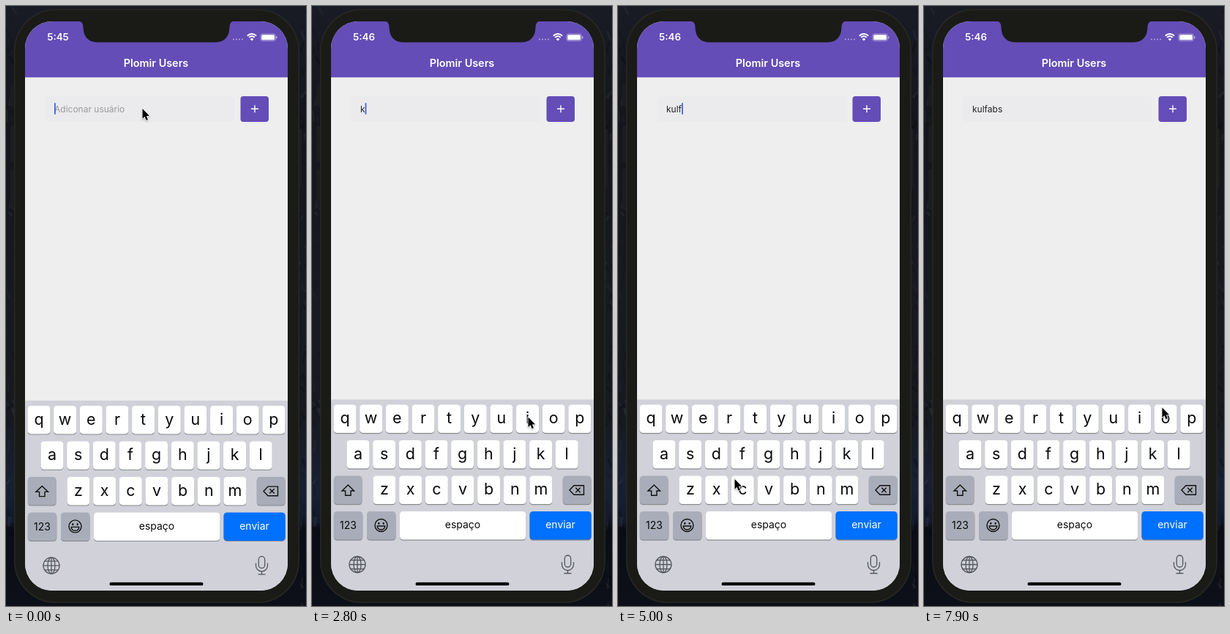
Write an HTML page with a canvas that moves like this. It is 410 px wide and 818 px high and loops after 8 s.

```html
<!DOCTYPE html>
<html lang="pt">
<head>
<meta charset="utf-8">
<title>Users</title>
<style>
html, body { margin: 0; width: 100%; height: 100%; overflow: hidden; background: #15161b; }
canvas { display: block; }
</style>
</head>
<body>
<canvas id="stage" width="410" height="818"></canvas>
<script>
const ctx = document.getElementById('stage').getContext('2d');
const LOOP = 8000, STEP = 100;
const PURPLE = '#644db7', FONT = 'Inter, Roboto, sans-serif';
const NAME = 'kulfabs';

const presses = [2600, 3100, 3500, 4800, 5700, 6500, 7100]
  .map((time, i) => ({ time, letter: NAME[i] }));

// Pointer stops: time, x, y
const stops = [
  [1700, 186, 139.5], [2500, 313, 607], [2600, 313, 607], [2800, 295, 560],
  [3000, 263, 560], [3200, 263, 560], [3500, 349, 607], [3600, 349, 607],
  [3900, 286.5, 650], [4600, 172, 610], [4800, 172, 610], [5000, 159, 644.5],
  [5600, 66, 607], [5800, 66, 607], [6200, 277, 679], [6400, 244, 658],
  [6600, 244, 658], [6900, 101, 609], [7200, 101, 609], [7900, 325, 547]
];

const rows = [
  { letters: 'qwertyuiop', x: 45, y: 543.5 },
  { letters: 'asdfghjkl', x: 63, y: 592 },
  { letters: 'zxcvbnm', x: 99, y: 640.5 }
];
const PITCH = 35.65, KEY_W = 31, KEY_H = 38.5;
const clamp = v => Math.min(1, Math.max(0, v));

function box(x, y, w, h, r, fill) {
  ctx.beginPath();
  ctx.roundRect(x, y, w, h, r);
  ctx.fillStyle = fill;
  ctx.fill();
}

function text(str, x, y, size, fill, weight = 400, align = 'center') {
  ctx.font = `${weight} ${size}px ${FONT}`;
  ctx.textAlign = align;
  ctx.fillStyle = fill;
  ctx.fillText(str, x, y);
}

function line(points, width, color, close) {
  ctx.beginPath();
  points.forEach(([x, y]) => ctx.lineTo(x, y));
  if (close) ctx.closePath();
  ctx.lineWidth = width;
  ctx.strokeStyle = color;
  ctx.stroke();
}

function arc(x, y, rx, ry, from = 0, to = Math.PI * 2) {
  ctx.beginPath();
  ctx.ellipse(x, y, rx, ry, 0, from, to);
}

function drawWallpaper() {
  const g = ctx.createLinearGradient(0, 0, 0, 818);
  [[0, '#191b25'], [.2, '#15161c'], [.5, '#181a21'], [.68, '#17191f'],
   [.8, '#182033'], [.86, '#121a2c'], [.87, '#0a0d15'], [1, '#0d1018']]
    .forEach(([p, c]) => g.addColorStop(p, c));
  ctx.fillStyle = g;
  ctx.fillRect(0, 0, 410, 818);
  let seed = 11;
  const rnd = () => (seed = seed * 16807 % 2147483647) / 2147483647;
  for (let i = 0; i < 150; i++) {
    const x = rnd() < .5 ? rnd() * 14 - 4 : 398 + rnd() * 14, y = rnd() * 818;
    const c = rnd() < .55 ? '5,6,10' : '70,76,92';
    line([[x, y], [x + rnd() * 14 - 7, y + 4 + rnd() * 12]], 1 + rnd() * 3, `rgba(${c},${rnd() * .3})`);
  }
}

function drawPhone() {
  [[107, 30], [163, 50], [222, 51]].forEach(([y, h]) => box(6, y, 8, h, 2, '#1c1d20'));
  box(397, 167, 7, 81, 2, '#1c1d20');
  box(11, 4, 390, 810, 57, '#272825');
  box(12.5, 5.5, 387, 807, 56, '#1a1b17');
}

function drawStatus(clock) {
  ctx.beginPath();
  ctx.moveTo(98, 20);
  ctx.quadraticCurveTo(105.5, 21, 105.5, 29);
  ctx.quadraticCurveTo(106, 49.5, 126, 49.5);
  ctx.lineTo(285, 49.5);
  ctx.quadraticCurveTo(305, 49.5, 305.5, 29);
  ctx.quadraticCurveTo(305.5, 21, 313, 20);
  ctx.fillStyle = '#1a1b17';
  ctx.fill();
  text(clock, 71, 47, 13.4, '#fff', 600);
  ctx.fillStyle = 'rgba(255,255,255,.45)';
  for (let i = 0; i < 4; i++) {
    arc(311 + i * 4, 45.5, 1.1, 1.1);
    ctx.fill();
  }
  ctx.strokeStyle = '#fff';
  ctx.lineWidth = 2;
  [8.4, 5.2].forEach(r => {
    arc(336, 46.5, r, r, -Math.PI * .76, -Math.PI * .24);
    ctx.stroke();
  });
  ctx.beginPath();
  ctx.moveTo(336, 47.5);
  ctx.arc(336, 47.5, 3.2, -Math.PI * .76, -Math.PI * .24);
  ctx.fillStyle = '#fff';
  ctx.fill();
  ctx.beginPath();
  ctx.roundRect(347.9, 38, 20.5, 9.6, 2.8);
  ctx.lineWidth = .8;
  ctx.strokeStyle = 'rgba(255,255,255,.55)';
  ctx.stroke();
  box(349.2, 39.3, 17.9, 7, 1.6, '#fff');
  box(369.2, 41.2, 1.3, 3.2, .7, 'rgba(255,255,255,.6)');
}

function caretAlpha(elapsed) {
  if (elapsed < 500) return 1;
  const p = elapsed % 1000;
  return p < 500 ? clamp((p - 50) / 150) : clamp((800 - p) / 300);
}

function drawForm(t) {
  box(53, 123.5, 259, 34, 4, '#ebebed');
  box(320.5, 123, 38.5, 35, 4, PURPLE);
  line([[335, 140.3], [345, 140.3]], 1.4, '#fff');
  line([[340, 135.3], [340, 145.3]], 1.4, '#fff');
  const done = presses.filter(p => p.time <= t);
  const typed = NAME.slice(0, done.length);
  if (typed) text(typed, 66, 144.5, 12, '#222', 400, 'left');
  else text('Adiconar usuário', 66, 144.5, 12, '#9b9b9d', 400, 'left');
  const x = 66 + (typed ? ctx.measureText(typed).width : 0);
  const last = done.length ? done[done.length - 1].time : -300;
  ctx.globalAlpha = caretAlpha(t - last);
  box(x, 132, 1.8, 16, .9, '#4264dc');
  ctx.globalAlpha = 1;
}

function key(x, y, w, fill) {
  box(x, y + 1.2, w, KEY_H, 4.5, '#898b91');
  box(x, y, w, KEY_H, 4.5, fill);
}

function drawIcons() {
  const ink = '#111';
  line([[49.3, 653], [57.5, 661], [53, 661], [53, 667.2], [45.6, 667.2], [45.6, 661], [41, 661]], 1.4, ink, true);
  line([[352, 660], [358, 653.7], [371.5, 653.7], [371.5, 666.3], [358, 666.3]], 1.4, ink, true);
  line([[360.3, 656.8], [366.7, 663.2]], 1.4, ink);
  line([[366.7, 656.8], [360.3, 663.2]], 1.4, ink);

  ctx.lineWidth = 1.4;
  arc(94.5, 708, 8.5, 8.5);
  ctx.stroke();
  ctx.fillStyle = ink;
  [91.3, 97.7].forEach(x => {
    arc(x, 705.3, 1.1, 1.6);
    ctx.fill();
  });
  arc(94.5, 709, 5.3, 5, 0, Math.PI);
  ctx.closePath();
  ctx.stroke();

  const gray = '#55585e';
  ctx.strokeStyle = gray;
  ctx.lineWidth = 1.3;
  [11, 5].forEach(r => {
    arc(62, 761.5, r, 11);
    ctx.stroke();
  });
  line([[62, 750.5], [62, 772.5]], 1.3, gray);
  [[755.5, 9], [761.5, 11], [767.5, 9]].forEach(([y, r]) => line([[62 - r, y], [62 + r, y]], 1.3, gray));

  ctx.beginPath();
  ctx.roundRect(345.3, 749, 8.4, 16, 4.2);
  ctx.stroke();
  ctx.beginPath();
  ctx.moveTo(341.5, 758);
  ctx.lineTo(341.5, 761.5);
  ctx.arc(349.5, 761.5, 8, Math.PI, 0, true);
  ctx.lineTo(357.5, 758);
  ctx.stroke();
  line([[349.5, 769.5], [349.5, 773.5]], 1.3, gray);
  line([[344.5, 773.5], [354.5, 773.5]], 1.3, gray);
}

function drawKeyboard(shift) {
  ctx.save();
  ctx.translate(0, shift);
  ctx.fillStyle = '#d0d1d9';
  ctx.fillRect(26, 536.5, 360, 270);
  rows.forEach(row => [...row.letters].forEach((letter, i) => {
    const x = row.x + i * PITCH;
    key(x - KEY_W / 2, row.y, KEY_W, '#fff');
    text(letter, x, row.y + 25.8, 21.5, '#0a0a0a');
  }));
  const gray = '#a9adb9';
  key(29.8, 640.5, 38.7, gray);
  key(342.8, 640.5, 38.7, gray);
  key(29.8, 689, 39.5, gray);
  key(75, 689, 39.5, gray);
  key(120, 689, 172.3, '#fff');
  key(297.5, 689, 84.2, '#0070ff');
  text('123', 49.5, 713.2, 14, '#0a0a0a');
  text('espaço', 206, 712.2, 14, '#0a0a0a');
  text('enviar', 339.5, 712.2, 14, '#fff');
  drawIcons();
  ctx.restore();
  box(141.5, 785.7, 128, 4.4, 2.2, '#000');
}

function drawBubble(letter) {
  const row = rows.find(r => r.letters.includes(letter));
  const x = row.x + row.letters.indexOf(letter) * PITCH;
  const top = row.y - 56, neck = row.y - 14, bottom = row.y + KEY_H;
  const wide = 30, half = KEY_W / 2;
  ctx.save();
  ctx.shadowColor = 'rgba(0,0,0,.3)';
  ctx.shadowBlur = 3;
  ctx.beginPath();
  ctx.moveTo(x - wide, neck);
  ctx.lineTo(x - wide, top + 9);
  ctx.quadraticCurveTo(x - wide, top, x - wide + 9, top);
  ctx.lineTo(x + wide - 9, top);
  ctx.quadraticCurveTo(x + wide, top, x + wide, top + 9);
  ctx.lineTo(x + wide, neck);
  ctx.bezierCurveTo(x + wide, neck + 11, x + half, neck + 10, x + half, neck + 23);
  ctx.lineTo(x + half, bottom - 4);
  ctx.quadraticCurveTo(x + half, bottom, x + half - 4, bottom);
  ctx.lineTo(x - half + 4, bottom);
  ctx.quadraticCurveTo(x - half, bottom, x - half, bottom - 4);
  ctx.lineTo(x - half, neck + 23);
  ctx.bezierCurveTo(x - half, neck + 10, x - wide, neck + 11, x - wide, neck);
  ctx.fillStyle = '#fff';
  ctx.fill();
  ctx.restore();
  text(letter, x, row.y - 18, 35, '#0a0a0a');
}

function pointerAt(t) {
  const next = stops.findIndex(s => s[0] > t);
  if (next === 0) return stops[0].slice(1);
  if (next < 0) return stops[stops.length - 1].slice(1);
  const [t0, x0, y0] = stops[next - 1], [t1, x1, y1] = stops[next];
  const p = (t - t0) / (t1 - t0), e = p * p * (3 - 2 * p);
  return [x0 + (x1 - x0) * e, y0 + (y1 - y0) * e];
}

function drawPointer([x, y]) {
  ctx.save();
  ctx.translate(x, y);
  ctx.lineJoin = 'round';
  ctx.shadowColor = 'rgba(0,0,0,.3)';
  ctx.shadowBlur = 2;
  ctx.shadowOffsetY = 1;
  line([[.5, .5], [.5, 14.2], [3.5, 11.3], [5.6, 16.2], [8, 15.2], [5.9, 10.4], [10, 10.3]], 1.8, '#fff', true);
  ctx.shadowColor = 'transparent';
  ctx.fillStyle = '#000';
  ctx.fill();
  ctx.restore();
}

function draw(t) {
  drawWallpaper();
  drawPhone();
  ctx.save();
  ctx.beginPath();
  ctx.roundRect(26, 21, 359, 776, 37);
  ctx.clip();
  ctx.fillStyle = '#eeeeee';
  ctx.fillRect(26, 21, 359, 776);
  ctx.fillStyle = PURPLE;
  ctx.fillRect(26, 21, 359, 76.3);
  drawStatus(t < 1700 ? '5:45' : '5:46');
  text('Plomir Users', 205, 83.3, 14.4, '#fff', 600);
  drawForm(t);
  drawKeyboard(1.4 * (1 - clamp(t / 400)));
  const held = presses.find(p => t >= p.time && t < p.time + STEP);
  if (held) drawBubble(held.letter);
  ctx.restore();
  drawPointer(pointerAt(t));
}

const start = performance.now();
function tick() {
  const t = (performance.now() - start) % LOOP;
  draw(Math.floor(t / STEP) * STEP);
  requestAnimationFrame(tick);
}
tick();
</script>
</body>
</html>
```
